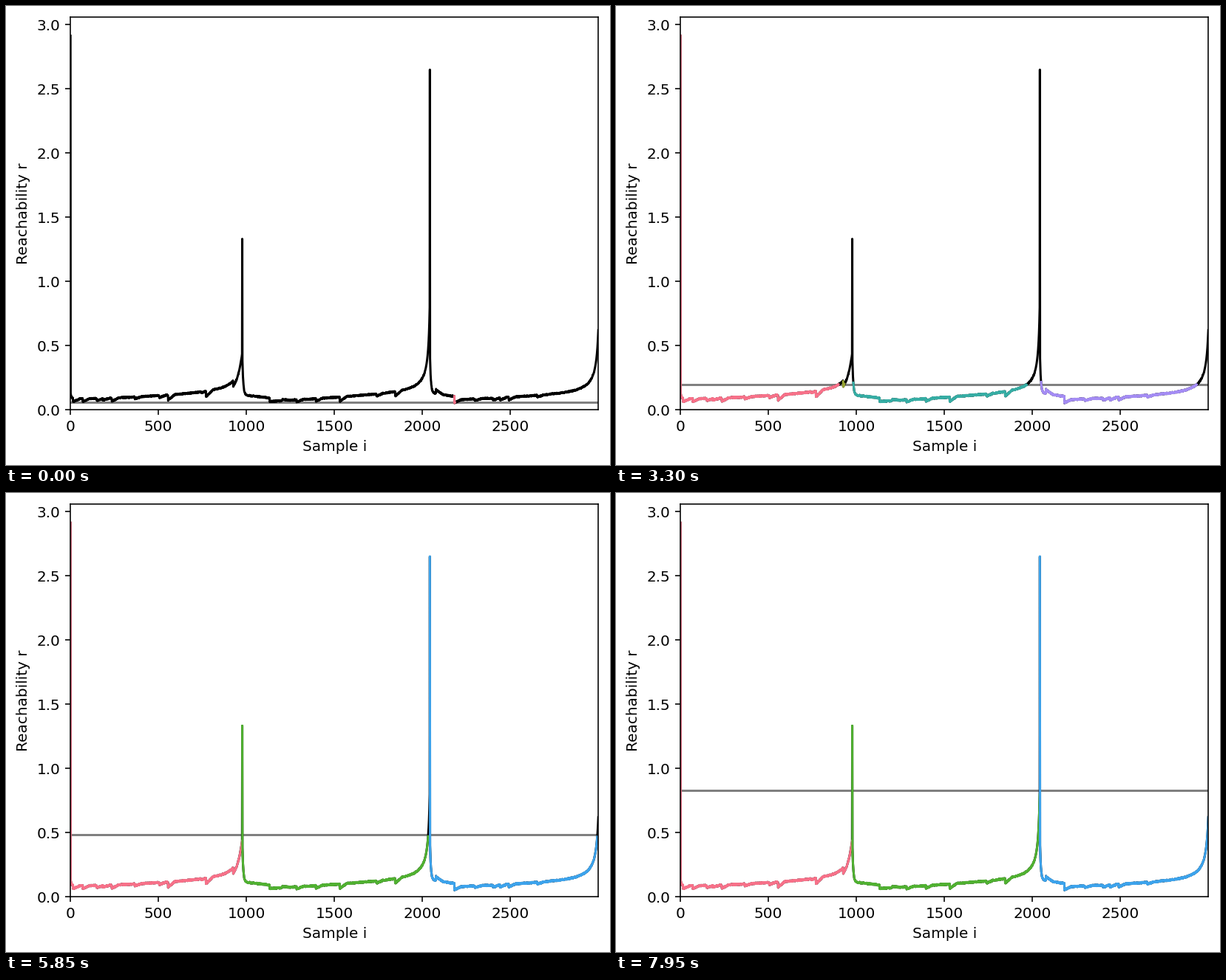
A matplotlib script that plays this animation: 817x622 px, repeating every 8000 ms.

```python
import matplotlib.pyplot as plt
import numpy as np
from matplotlib.animation import FuncAnimation
from matplotlib.collections import LineCollection

W, H, DPI = 817, 622, 144
TICK_MS, LOOP_MS, TICKS_PER_STEP = 50, 8000, 3
SAMPLES = 3000
LINE_WIDTH = 1.5

# Sudden relative drops that heal over NOTCH_SPAN samples; negative ones rise.
NOTCH_SPAN = 40
NOTCHES = {15: .27, 70: .25, 150: .15, 185: .12, 235: .27, 365: .14, 505: .14,
           555: .35, 742: .05, 770: .3, 925: .2, 1205: -.15, 1285: .2, 1395: .22,
           1530: .35, 1738: .15, 1845: .25, 2077: -.25, 2182: .3, 2298: .15,
           2400: .2, 2440: .2, 2490: .23, 2652: .12}

XYZ_TO_RGB = np.array([[3.24097, -1.53738, -.49861],
                       [-.96924, 1.87597, .04156],
                       [.05563, -.20398, 1.05697]])


def even_hue(turn, saturation=.891, light=64.35):
    """Perceptually even colour: the given share of the largest in-gamut chroma."""
    angle = np.radians(turn % 1 * 359)

    def linear_rgb(chroma):
        u = chroma * np.cos(angle) / (13 * light) + .19783
        v = chroma * np.sin(angle) / (13 * light) + .46832
        y = ((light + 16) / 116) ** 3
        x = 9 * y * u / (4 * v)
        z = (9 * y - 15 * v * y - v * x) / (3 * v)
        return XYZ_TO_RGB @ np.array([x, y + 0 * x, z])

    chroma = np.linspace(0, 220, 2201)
    rgb = linear_rgb(chroma)
    inside = ((rgb >= 0) & (rgb <= 1)).all(axis=0)
    top = chroma[np.argmin(inside) - 1]
    rgb = linear_rgb(top * saturation)
    return np.clip(1.055 * np.maximum(rgb, .0031308) ** (1 / 2.4) - .055, 0, 1)


def valley(count, peak, floor, slope, gain, gap, shoulder):
    """A peak, a quick fall onto a shoulder, then a hyperbolic climb."""
    n = np.arange(count)
    u = n / count
    climb = floor + slope * u + gain / (1 + gap - u)
    ledge = shoulder * (1 - u / .25) * (u < .146)
    r = climb + ledge + 5 * shoulder * np.exp(-n / 5)
    r[0] = peak
    return r


def threshold(step):
    return .055 + .00065 * step + .000263 * step ** 2


def clusters(eps):
    """Runs of reachable samples, each with the far sample that opens it."""
    near = (level <= eps).astype(int)
    runs = np.flatnonzero(np.diff(np.r_[0, near, 0])).reshape(-1, 2)
    return [(max(start - 1, 0), end) for start, end in runs]


sample = np.arange(SAMPLES)
level = np.concatenate([
    valley(976, 2.912, .065, .055, .0085, .026, .01),
    valley(1066, 1.33, .045, .08, .006, .008, .065),
    valley(958, 2.648, .06, .05, .0075, .0137, .065),
])
for start, depth in NOTCHES.items():
    level[start:start + NOTCH_SPAN] *= 1 - depth * np.linspace(1, 0, NOTCH_SPAN)
jitter = np.random.default_rng(4).uniform(-.005, .005, SAMPLES)
reach = level + jitter * (level < .3)
curve = np.column_stack([sample, reach])

fig = plt.figure(figsize=((W + 1e-6) / DPI, (H + 1e-6) / DPI), dpi=DPI)
ax = fig.add_axes([87.2 / W, 1 - 547 / H, 714.24 / W, 532.2 / H])
ax.set(xlim=(0, SAMPLES), ylim=(0, 3.0587), xlabel="Sample i",
       ylabel="Reachability r", xticks=range(0, SAMPLES, 500),
       yticks=np.arange(0, 3.1, .5))

cut = ax.axhline(0, color="gray", lw=LINE_WIDTH)
ax.plot(sample, reach, color="black", lw=LINE_WIDTH)
parts = LineCollection([], linewidths=LINE_WIDTH, capstyle="projecting",
                       joinstyle="round", zorder=2.2)
ax.add_collection(parts, autolim=False)


def update(tick):
    if tick % TICKS_PER_STEP == 0:
        eps = threshold(tick // TICKS_PER_STEP)
        found = clusters(eps)
        cut.set_ydata([eps, eps])
        parts.set_segments([curve[a:b] for a, b in found])
        parts.set_color([even_hue(.01 + i / len(found)) for i in range(len(found))])
    return cut, parts


anim = FuncAnimation(fig, update, frames=LOOP_MS // TICK_MS, interval=TICK_MS,
                     init_func=lambda: update(0), repeat=True, repeat_delay=0)
plt.show()
```
